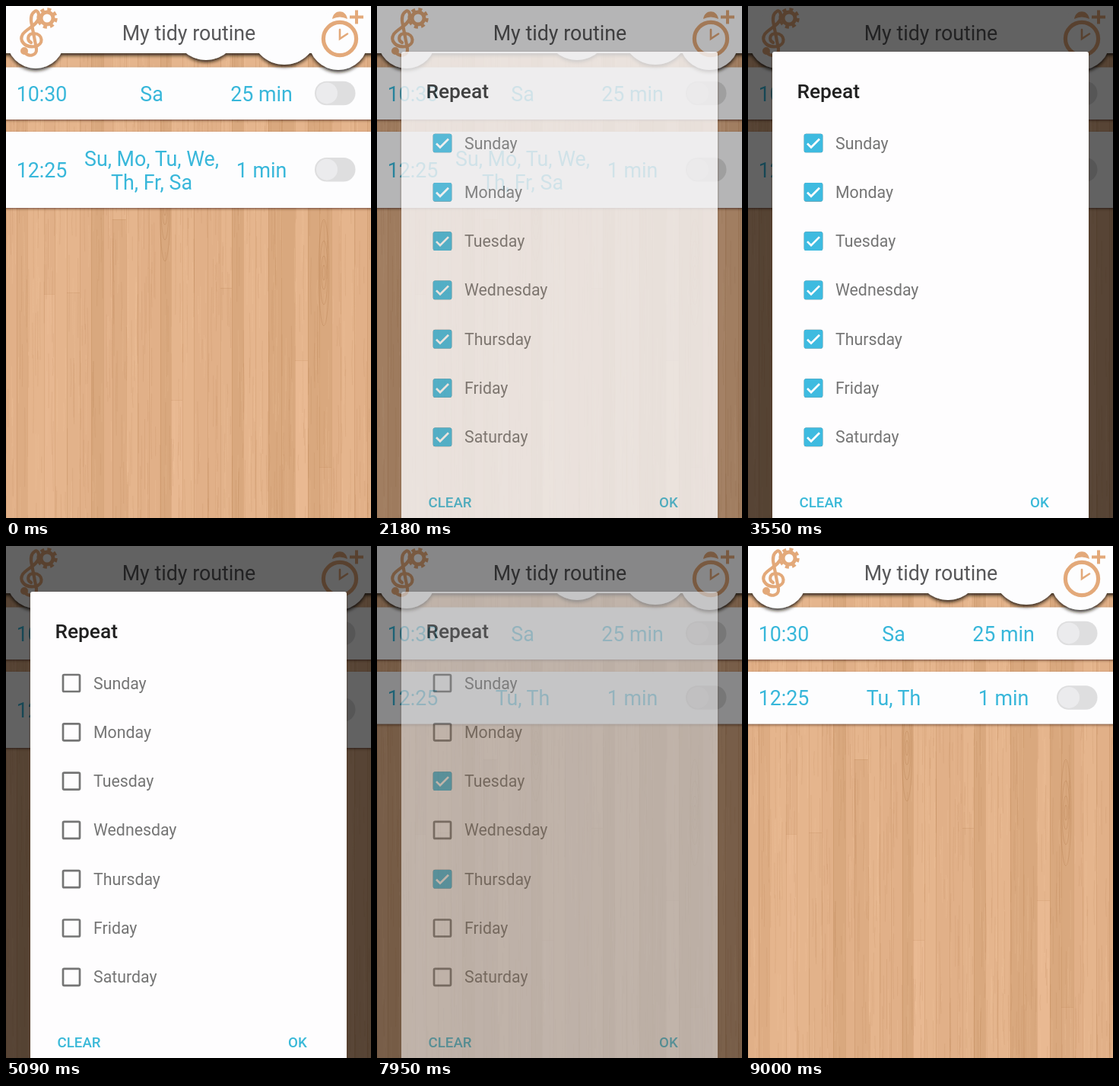
An HTML page with a canvas for the animation above (9.05 s loop, 480 by 672 pixels).

```html
<!DOCTYPE html>
<html lang="en">
<head>
<meta charset="utf-8">
<title>Alarm repeat days</title>
<style>
  html, body { margin: 0; width: 100%; height: 100%; overflow: hidden; background: #e2b188; }
  canvas, #stage { position: absolute; left: 0; top: 0; width: 100%; height: 100%; display: block; }
  text { font-family: Roboto, sans-serif; }
  .cell { font-size: 26.8px; fill: #38b7da; text-anchor: middle; }
  .label { font-size: 21.3px; fill: #757575; }
  .button { font-size: 18.7px; font-weight: 500; fill: #3ab9d8; }
  .card { fill: #fdfdfe; filter: url(#shadow); }
  .header { fill: #fdfdfe; filter: url(#deepShadow); }
</style>
</head>
<body>
<canvas id="wood" width="480" height="672"></canvas>
<svg id="stage" viewBox="0 0 480 672" preserveAspectRatio="none">
  <defs>
    <filter id="shadow" x="-10%" y="-20%" width="120%" height="150%">
      <feDropShadow dx="0" dy="1.500" stdDeviation="1.500" flood-color="#3a2410" flood-opacity=".6"/>
    </filter>
    <filter id="deepShadow" x="-10%" y="-20%" width="120%" height="150%">
      <feDropShadow dx="0" dy="3" stdDeviation="2.200" flood-color="#20140a" flood-opacity=".85"/>
    </filter>
  </defs>
  <g id="cards"></g>
  <g class="header">
    <path d="M-8 -8H488V62H-8Z"/>
    <circle cx="39" cy="44" r="38"/>
    <circle cx="263" cy="29" r="42"/>
    <circle cx="366" cy="33" r="44"/>
    <circle cx="437" cy="45" r="39"/>
  </g>
  <text x="240.5" y="45" font-size="26.8" fill="#58585a" text-anchor="middle">My tidy routine</text>
  <g fill="none" stroke="#e3a97a" stroke-linecap="round">
    <path stroke-width="4.2" d="M33 48C27 45 28 36 37 36C49 37 50 51 38 53C24 55 17 45 22 37C27 30 41 25 43 16C44 9 41 5 38 7C33 10 32 17 34 25L40 56C41 66 29 67 25 61"/>
    <circle cx="24" cy="59" r="2.5" stroke-width="5"/>
    <circle cx="54" cy="16" r="8" stroke-width="5"/>
    <circle cx="54" cy="16" r="11.7" stroke-width="4" stroke-linecap="butt" stroke-dasharray="5 4.19"/>
    <circle cx="439" cy="43" r="21.6" stroke-width="5.2"/>
    <path stroke-width="2.6" d="M439 31V43L449 36.500"/>
    <path fill="#e3a97a" stroke="none" d="M429 17C431 4 447 4 449 17Q439 12 429 17Z"/>
    <path stroke-width="4" stroke-linecap="butt" d="M452 14.500H470M461 5.500V23.500"/>
  </g>
  <rect id="dim" width="480" height="672"/>
  <g id="dialog">
    <rect x="32" y="60" width="416" height="640" rx="3" fill="#fefdfe" filter="url(#shadow)"/>
    <text x="64.500" y="121" font-size="26.300" font-weight="500" fill="#202020">Repeat</text>
    <g id="days"></g>
    <text class="button" x="67.500" y="658">CLEAR</text>
    <text class="button" x="371" y="658">OK</text>
  </g>
  <svg id="clip"><circle id="ripple"/></svg>
  <circle id="dot" r="14.500" fill="#fbfbfc" fill-opacity=".9" stroke="#bdbdc0" stroke-width="1.600"/>
</svg>
<script>
const LOOP = 9050;
const OPEN = 2040, CLEAR = 4150, CLOSE = 7880, DIM_TIME = 300;
const $ = id => document.getElementById(id);
const clamp = v => Math.max(0, Math.min(1, v));
const ramp = (t, start, length) => clamp((t - start) / length);

function paintWood() {
  const ctx = $('wood').getContext('2d');
  let seed = 11;
  const random = () => (seed = seed * 16807 % 2147483647) / 2147483647;
  const edges = [0, 14, 28, 50, 64, 80, 97, 112, 128, 140, 158, 173, 188, 203, 217, 232, 247,
    265, 282, 297, 312, 328, 345, 362, 380, 397, 412, 428, 440, 458, 475, 480];
  const tones = '2132332023322033223033003002321';
  // Plank index: height of its joint and the change of tone below it.
  const joints = { 3: [378, 1.5], 5: [376, -.7], 9: [280, -2], 14: [517, .7], 18: [370, -.7], 24: [465, 1], 26: [605, .7] };
  const plank = (x, y, w, tone) => {
    ctx.fillStyle = `rgb(${217 + tone * 4}, ${168 + tone * 4.2}, ${126 + tone * 5})`;
    ctx.fillRect(x, y, w, 672);
  };
  edges.slice(0, -1).forEach((x, i) => {
    const width = edges[i + 1] - x, tone = +tones[i];
    plank(x, 0, width, tone);
    ctx.fillStyle = 'rgba(155, 95, 45, .13)';
    ctx.fillRect(x, 0, 1, 672);
    if (!joints[i]) return;
    const [y, change] = joints[i];
    plank(x, y, width, tone + change);
    ctx.fillStyle = 'rgba(155, 95, 45, .13)';
    ctx.fillRect(x, y, width, 1);
    ctx.fillRect(x, y, 1, 672);
  });
  for (let i = 0; i < 900; i++) {
    const x = random() * 480, y = random() * 720 - 50, length = 20 + random() * 90;
    ctx.strokeStyle = random() < .6 ? 'rgba(160, 100, 50, .1)' : 'rgba(255, 215, 175, .13)';
    ctx.beginPath();
    ctx.moveTo(x, y);
    ctx.quadraticCurveTo(x + random() * 4 - 2, y + length / 2, x, y + length);
    ctx.stroke();
  }
  ctx.strokeStyle = 'rgba(150, 90, 42, .18)';
  for (const [x, y] of [[209, 265], [418, 350]])
    for (let r = 1; r < 5; r++) {
      ctx.beginPath();
      ctx.ellipse(x, y, r * 1.7, r * r * 4 + 6, 0, 0, 7);
      ctx.stroke();
    }
}

const text = (x, y, content) => `<text class="cell" x="${x}" y="${y}">${content}</text>`;

function card(top, height, time, days, length) {
  const middle = top + height / 2, base = Math.round(middle + 10);
  const dayLines = days.map((line, i) =>
    text(191.5, base + (i - (days.length - 1) / 2) * 31, line)).join('');
  return `<rect class="card" x="-2" y="${top}" width="484" height="${height}" rx="2"/>
    ${text(47, base, time)}${dayLines}${text(336, base, length)}
    <rect x="406" y="${middle - 16}" width="53.500" height="31.500" rx="15.700" fill="#dededf"/>
    <circle cx="422" cy="${middle - .3}" r="14" fill="#ebebed"/>`;
}

const firstCard = card(80.5, 68.5, '10:30', ['Sa'], '25 min');
const lists = [
  firstCard + card(165, 100, '12:25', ['Su, Mo, Tu, We,', 'Th, Fr, Sa'], '1 min'),
  firstCard + card(165, 68.5, '12:25', ['Tu, Th'], '1 min')
];
$('cards').innerHTML = lists.map(list => `<g>${list}</g>`).join('');
const [listBefore, listAfter] = $('cards').children;

const rowY = i => 180 + i * 64.3;
const dayNames = ['Sunday', 'Monday', 'Tuesday', 'Wednesday', 'Thursday', 'Friday', 'Saturday'];
const checkedAt = { Tuesday: 5930, Thursday: 6780 };
$('days').innerHTML = dayNames.map((name, i) => `
  <g transform="translate(86 ${rowY(i)})">
    <rect x="-11" y="-11" width="22" height="22" rx="1.500" fill="none" stroke="#757575" stroke-width="2.700"/>
    <g class="mark">
      <rect x="-12.300" y="-12.300" width="24.600" height="24.600" rx="2.500" fill="#3ebbe0"/>
      <path d="M-8 .5L-3 5.500L8 -5.500" fill="none" stroke="#fff" stroke-width="2.700"/>
    </g>
    <text class="label" x="29" y="7.500">${name}</text>
  </g>`).join('');
const marks = document.querySelectorAll('.mark');

// Each tap ripples inside its box: [x, y, width, height].
const rowBox = i => [32, rowY(i) - 32, 416, 64];
const taps = [
  { at: 1760, x: 198, y: 203, box: [95, 167, 193, 97] },
  { at: 4000, x: 97, y: 650, box: [55, 630, 84, 42] },
  { at: 5780, x: 150, y: rowY(2), box: rowBox(2) },
  { at: 6630, x: 150, y: rowY(4), box: rowBox(4) },
  { at: 7600, x: 384, y: 650, box: [342, 630, 84, 42] }
];

function set(node, attributes) {
  for (const name in attributes) node.setAttribute(name, attributes[name]);
}

function drawTap(t) {
  const tap = taps.find(({ at }) => t >= at && t < at + 300);
  $('clip').style.display = $('dot').style.display = tap ? '' : 'none';
  if (!tap) return;
  const age = t - tap.at, [x, y, width, height] = tap.box;
  const fade = 1 - ramp(age, 170, 130);
  set($('clip'), { x, y, width, height, opacity: fade });
  $('clip').style.background = 'rgba(0, 0, 0, .045)';
  set($('ripple'), { cx: tap.x - x - 1, cy: tap.y - y + 5, r: 20 + age * .22, fill: '#000', 'fill-opacity': .06 });
  set($('dot'), { cx: tap.x, cy: tap.y, opacity: ramp(age, 0, 40) * fade });
}

function draw(t) {
  listBefore.style.display = t < CLOSE ? '' : 'none';
  listAfter.style.display = t < CLOSE ? 'none' : '';
  set($('dim'), { opacity: .61 * (ramp(t, OPEN, DIM_TIME) - ramp(t, CLOSE, DIM_TIME)) });
  set($('dialog'), { opacity: ramp(t, OPEN, 180) - ramp(t, CLOSE, 150) });
  marks.forEach((mark, i) => {
    const on = checkedAt[dayNames[i]] ?? LOOP;
    const amount = 1 - ramp(t, CLEAR, 120) + ramp(t, on, 120);
    set(mark, { opacity: amount, transform: `scale(${.7 + .3 * amount})` });
  });
  drawTap(t);
}

function frame() {
  draw(performance.now() % LOOP);
  requestAnimationFrame(frame);
}

paintWood();
frame();
</script>
</body>
</html>
```
